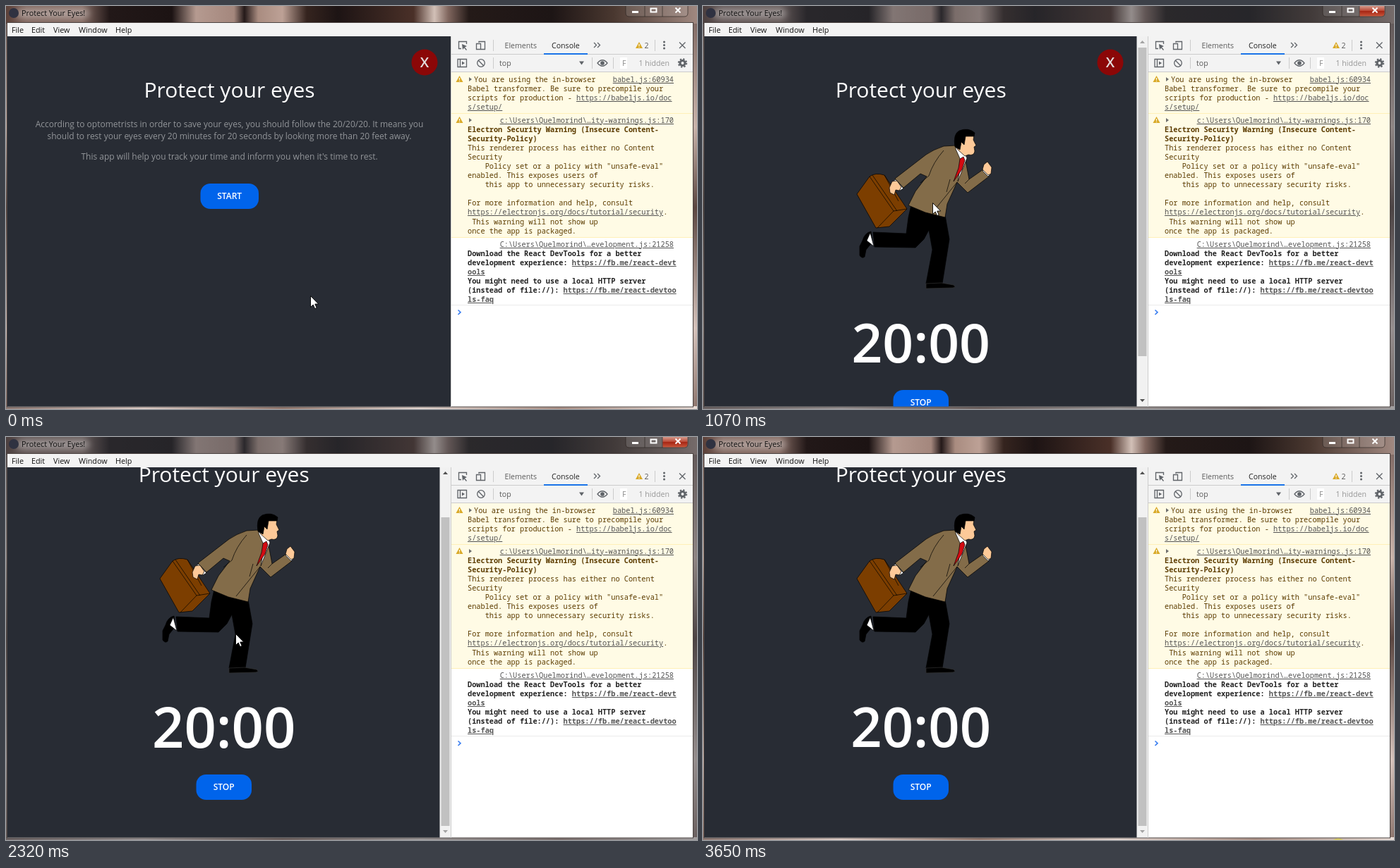
Animation of 979 by 572 pixels, one loop 3.73 s. Source, as an HTML page:

```html
<!DOCTYPE html>
<html lang="en">
<head>
<meta charset="utf-8">
<title>Protect Your Eyes!</title>
<style>
html, body { margin: 0; width: 100%; height: 100%; overflow: hidden; background: #fff; }
svg { position: absolute; left: 0; top: 0; display: block; }
text { font-family: "Open Sans", "Noto Sans", sans-serif; }
.ui { font-size: 10.8px; fill: #111; }
.tool { font-size: 10.6px; fill: #5a5a5a; }
.app { text-anchor: middle; fill: #fff; }
.title { font-size: 30px; }
.copy { font-size: 12px; fill: #929599; }
.label { font-size: 12px; font-weight: 600; }
.cross { font-size: 20px; font-weight: 600; fill: #e4dede; }
.clock { font-size: 76px; font-weight: 600; }
.icon { fill: none; stroke: #5f6368; stroke-width: 1.3; }
pre {
  position: absolute; left: 654px; width: 300px; margin: 0; color: #5c3c00;
  font: 10.27px/13.1px "Noto Sans Mono", "DejaVu Sans Mono", monospace;
}
pre.plain { color: #222; }
pre u { color: #545454; }
pre .src { position: absolute; right: 8px; top: 0; font-weight: 400; }
</style>
</head>
<body>
<svg width="979" height="572" viewBox="0 0 979 572">
  <defs>
    <linearGradient id="top">
      <stop offset="0" stop-color="#5b4038"/><stop offset=".03" stop-color="#80665e"/>
      <stop offset=".11" stop-color="#846a62"/><stop offset=".15" stop-color="#221818"/>
      <stop offset=".24" stop-color="#1c1313"/><stop offset=".275" stop-color="#b59a90"/>
      <stop offset=".33" stop-color="#a4877d"/><stop offset=".345" stop-color="#241919"/>
      <stop offset=".365" stop-color="#a98c80"/><stop offset=".4" stop-color="#bda196"/>
      <stop offset=".435" stop-color="#35241f"/><stop offset=".48" stop-color="#1d1414"/>
      <stop offset=".59" stop-color="#4a3028"/><stop offset=".62" stop-color="#d2c0b7"/>
      <stop offset=".64" stop-color="#80665e"/><stop offset=".67" stop-color="#241a18"/>
      <stop offset=".79" stop-color="#1d1515"/><stop offset=".88" stop-color="#4a3830"/>
      <stop offset="1" stop-color="#a08880"/>
    </linearGradient>
    <linearGradient id="side" x2="0" y2="1">
      <stop offset="0" stop-color="#77605a"/><stop offset=".3" stop-color="#c9b3aa"/>
      <stop offset=".5" stop-color="#5b4640"/><stop offset=".8" stop-color="#d5c2bb"/>
      <stop offset="1" stop-color="#8d756d"/>
    </linearGradient>
    <linearGradient id="base">
      <stop offset="0" stop-color="#8f7b75"/><stop offset=".2" stop-color="#dcccc6"/>
      <stop offset=".4" stop-color="#947a70"/><stop offset=".6" stop-color="#e3d6d0"/>
      <stop offset=".8" stop-color="#ab9187"/><stop offset="1" stop-color="#e8dcd6"/>
    </linearGradient>
    <linearGradient id="red" x2="0" y2="1">
      <stop offset="0" stop-color="#d59a8c"/><stop offset=".45" stop-color="#bd4b38"/>
      <stop offset=".5" stop-color="#a62413"/><stop offset="1" stop-color="#c8553a"/>
    </linearGradient>
    <filter id="blur" x="-20%" y="-100%" width="140%" height="300%"><feGaussianBlur stdDeviation="5"/></filter>
    <clipPath id="panel"><path d="M2 43H630.5V568.5H2Z"/></clipPath>
  </defs>

  <!-- window frame -->
  <rect width="979" height="572" fill="url(#side)"/>
  <rect width="979" height="25" fill="url(#top)"/>
  <rect y="568" width="979" height="4" fill="url(#base)"/>
  <path id="tint" d="M0 0H979V572H0Z" fill="#35404a" opacity="0"/>
  <rect x="14" y="4" width="104" height="13" rx="6" fill="#fff" opacity=".38" filter="url(#blur)"/>
  <path d="M878 0V10Q878 15 883 15H961Q966 15 966 10V0M905 0V15M930 0V15" fill="#fff" fill-opacity=".12" stroke="#2a2220" stroke-opacity=".65"/>
  <path id="close" d="M930.5 0V14.5H961Q965.5 14.5 965.5 10V0Z" fill="url(#red)" opacity="0"/>
  <path d="M887 8.5H896" stroke="#fff" stroke-width="3"/>
  <rect x="913.5" y="3.5" width="8" height="5" fill="none" stroke="#fff" stroke-width="2"/>
  <path d="M948.5 2.5L955.5 9.5M955.5 2.5L948.5 9.5" stroke="#fff" stroke-width="2"/>
  <circle cx="11" cy="10" r="7" fill="#2f3241"/>
  <text class="ui" x="22" y="14">Protect Your Eyes!</text>
  <rect x="1.5" y="23.5" width="972" height="545.5" fill="#fff" stroke="#4a4240"/>
  <path d="M2 24H973V43H2Z" fill="#f3f3f3"/>
  <g class="ui">
    <text x="8" y="38">File</text><text x="36" y="38">Edit</text><text x="67" y="38">View</text>
    <text x="103" y="38">Window</text><text x="155" y="38">Help</text>
  </g>

  <!-- app -->
  <g clip-path="url(#panel)">
    <path d="M2 43H631V569H2Z" fill="#282c34"/>
    <g id="intro" class="app">
      <circle cx="593" cy="80" r="18.5" fill="#8b0707"/>
      <text class="cross" x="593" y="87">X</text>
      <text class="title" x="316.5" y="130">Protect your eyes</text>
      <g class="copy">
        <text class="copy" x="316.5" y="172">According to optometrists in order to save your eyes, you should follow the 20/20/20. It means you</text>
        <text class="copy" x="316.5" y="189">should to rest your eyes every 20 minutes for 20 seconds by looking more than 20 feet away.</text>
        <text class="copy" x="316.5" y="218">This app will help you track your time and inform you when it's time to rest.</text>
      </g>
      <rect x="275.5" y="252" width="82.5" height="36" rx="14" fill="#0064eb"/>
      <text class="label" x="316.7" y="274.3">START</text>
    </g>
    <g id="timer" class="app" display="none">
      <g id="page">
        <circle cx="577" cy="80" r="18.5" fill="#8b0707"/>
        <text class="cross" x="577" y="87">X</text>
        <text class="title" x="308.7" y="130">Protect your eyes</text>
        <g stroke="#000" stroke-width=".7" stroke-linejoin="round">
          <path d="M296 278L291 300L288 323L241 321L243 342L301 343L313 331L320 318L325 346L316 394H339L349 331L343 297Z" fill="#000"/>
          <path d="M316 394L338 393L355 396Q359 399 354 400L316 401Z" fill="#000" stroke="#333"/>
          <path d="M238 320Q229 322 226 333L222 341V354Q225 359 229 356L231 346L240 335Z" fill="#000"/>
          <path d="M237 322L242 341L232 333Z" fill="#fff"/>
          <path d="M218 267L236 242Q244 236 257 240L289 288L264 313L245 315Z" fill="#7c3e00"/>
          <path d="M236 242L270 291L247 315M257 240L277 277M270 291L289 288M240 240L275 291" fill="none"/>
          <path d="M273 246L284 259L279 262L269 249Z" fill="#fff"/>
          <path d="M264 258L268 249L275 248L281 257L278 262L273 261L271 268L265 265Z" fill="#fdc998"/>
          <path d="M358 198L341 199Q326 204 316 211L272 245L284 258L308 238L317 242L301 263L291 283L315 293L343 300L346 281L360 250L375 265L405 242L397 232L377 246L370 209Z" fill="#836c49"/>
          <path d="M360 250L326 292M341 205Q326 222 320 241L308 251M350 246L345 264M377 246L371 252" fill="none"/>
          <path d="M359 196L358 203L366 221L361 249L374 216L371 209Z" fill="#fff"/>
          <path d="M364 217L369 214L371 219L367 232L355 249L362 230Z" fill="#d30b12"/>
          <path d="M396 234L404 242L408 238L399 231Z" fill="#fff"/>
          <path d="M396 232L398 225L403 221L409 229L408 238L404 240Z" fill="#fdc998"/>
          <path d="M363 186Q370 180 384 183L383 190L387 198L384 200L385 206Q384 213 376 211L371 213L360 203Z" fill="#fdc998"/>
          <path d="M357 200Q354 182 363 177Q376 172 385 180L384 185L372 185L370 197L366 193L364 204Z" fill="#000"/>
        </g>
        <g id="pulse"><text class="clock" x="308.7" y="505.5">20:00</text></g>
        <rect x="269.5" y="545" width="78.5" height="36" rx="14" fill="#0064eb"/>
        <text class="label" x="308.7" y="567.3">STOP</text>
      </g>
      <path d="M614.5 43H631V569H614.5Z" fill="#f1f1f1"/>
      <rect id="thumb" x="616.5" width="12" height="438" fill="#c1c1c1"/>
      <path id="up" d="M619 53L622.5 49L626 53Z"/>
      <path id="down" d="M619 558L622.5 562L626 558Z"/>
    </g>
  </g>

  <!-- developer tools -->
  <path d="M631 43H973V93.5H631Z" fill="#f3f3f3"/>
  <path d="M631 68.5H973M631 93.5H973M630.5 43V569" stroke="#ccc"/>
  <path d="M631 94H973V328H631Z" fill="#fffbe5"/>
  <path d="M631 152.5H973M631 328.5H973" stroke="#fff0b8"/>
  <path d="M631 424.5H973" stroke="#ececec"/>
  <path d="M762 67H824V69H762Z" fill="#1a73e8"/>
  <g stroke="#ccc"><path d="M690.5 48V64M690.5 73V89M830.5 73V89M860.5 73V89M919.5 48V64"/></g>
  <g class="icon">
    <path d="M645 60.5H641.5V50.5H652.5V54"/>
    <path d="M646 54L653 57L650 58.5L653 62L652 63L649 59.5L647 62Z" fill="#5f6368" stroke="none"/>
    <path d="M670 52V50.5H678.5V61.5H673M666.5 53.5H672.5V61.5H666.5Z"/>
    <path d="M640 75.5H652.5V86.5H640ZM643.5 75.5V86.5"/><path d="M646 78.5L650 81L646 83.5Z" fill="#5f6368" stroke="none"/>
    <circle cx="673" cy="81" r="5.3"/><path d="M669.3 77.3L676.7 84.7"/>
    <path d="M833 52L836.5 55.5L833 59M838 52L841.5 55.5L838 59"/>
    <path d="M954 51.5L962.5 60M962.5 51.5L954 60"/>
    <path d="M838 81Q845 72.5 852 81Q845 89.5 838 81Z"/><circle cx="845" cy="81" r="2.2" fill="#5f6368"/>
    <circle cx="958.5" cy="81" r="3.5" stroke-width="3"/><circle cx="958.5" cy="81" r="5.7" stroke-width="2" stroke-dasharray="2.3 2.18"/>
  </g>
  <g fill="#5f6368"><circle cx="932.5" cy="51" r="1.5"/><circle cx="932.5" cy="55.5" r="1.5"/><circle cx="932.5" cy="60" r="1.5"/><path d="M812 78.5H819L815.5 83.5Z"/></g>
  <path d="M870 73H880V89H870Z" fill="#fff"/>
  <g class="tool">
    <text x="706.5" y="60">Elements</text><text x="773" y="60" fill="#222">Console</text><text x="904.5" y="60">2</text>
    <text x="699" y="85">top</text><text x="873" y="85" opacity=".7">F</text><text x="896.5" y="85" opacity=".6">1 hidden</text>
  </g>
  <g id="warn"><path d="M897 51L902 60H892Z" fill="#d9a927"/><path d="M897 54V57M897 58V59" stroke="#fff" stroke-width="1.2"/></g>
  <use href="#warn" x="-254.500" y="48"/><use href="#warn" x="-254.500" y="106"/>
  <path d="M656 101L660 104L656 107ZM656 159L660 162L656 165Z" fill="#6e6e6e"/>
  <path d="M640.500 431.500L644 434.700L640.500 438" fill="none" stroke="#367cf1" stroke-width="1.600"/>
</svg>

<pre style="top:97.500px"><span style="padding-left:9px">You are using the in-browser</span><u class="src">babel.js:60934</u>
Babel transformer. Be sure to precompile your
scripts for production - <u>https://babeljs.io/doc</u>
<u>s/setup/</u></pre>
<pre style="top:155.500px"><u class="src">c:\Users\Quelmorind\…ity-warnings.js:170</u>&nbsp;
<b>Electron Security Warning (Insecure Content-
Security-Policy)</b>
This renderer process has either no Content
Security
    Policy set or a policy with "unsafe-eval"
enabled. This exposes users of
    this app to unnecessary security risks.

For more information and help, consult
<u>https://electronjs.org/docs/tutorial/security</u>.
 This warning will not show up
once the app is packaged.</pre>
<pre class="plain" style="top:331.500px"><u class="src">C:\Users\Quelmorind\…evelopment.js:21258</u>&nbsp;
<b>Download the React DevTools for a better
development experience: <u>https://fb.me/react-devt</u>
<u>ools</u>
You might need to use a local HTTP server
(instead of file://): <u>https://fb.me/react-devtoo</u>
<u>ls-faq</u></b></pre>

<svg width="979" height="572" viewBox="0 0 979 572">
  <g id="pointer">
    <circle id="click" r="11.500" fill="#dcd81a" opacity=".5"/>
    <path id="arrow" d="M.5 .5V16.500L4.200 13L6.700 18.600L9.200 17.500L6.800 12H11.700Z" fill="#fff" stroke="#000" stroke-width=".9"/>
    <path id="hand" d="M.5 12V2Q2 -.5 3.500 2V7.500L10 9Q11.500 9.500 11.300 12L9.500 19.500H2.500L-3 12.500Q-3.500 9.500 -1 10.500Z" fill="#fff" stroke="#222" stroke-width=".9"/>
  </g>
</svg>

<script>
const LOOP = 3730, OPEN = 990, SCROLL = 66;
const bursts = [[70, 540, 7], [690, 820, 2], [990, 1390, 6], [1540, 2020, 7],
  [2090, 2550, 7], [2630, 3100, 7], [3180, 3410, 4], [3560, 3650, 2]];
const ticks = [0, ...bursts.flatMap(([a, b, n]) =>
  Array.from({ length: n }, (_, i) => a + (b - a) * i / (n - 1)))];
// Pointer route as [time, x, y]
const route = [[0, 431, 411], [150, 413, 388], [300, 365, 325], [450, 328, 283], [540, 325, 279],
  [2320, 325, 279], [2550, 699, 480], [2860, 832, 538], [3100, 891, 562], [3250, 900, 581], [LOOP, 900, 581]];

const $ = id => document.getElementById(id);
const set = (id, name, value) => $(id).setAttribute(name, value);
const show = (id, on) => set(id, 'display', on ? 'inline' : 'none');
const clamp = v => Math.min(1, Math.max(0, v));
const smooth = p => p * p * (3 - 2 * p);

// cubic-bezier(.25, .1, .25, 1)
function ease(x) {
  const curve = (s, a, b) => 3 * (1 - s) ** 2 * s * a + 3 * (1 - s) * s * s * b + s ** 3;
  let lo = 0, hi = 1;
  for (let i = 0; i < 20; i++) {
    const mid = (lo + hi) / 2;
    if (curve(mid, .25, .25) < x) lo = mid; else hi = mid;
  }
  return curve(lo, .1, 1);
}

function pointAt(t) {
  const i = route.findIndex(p => p[0] > t);
  const [t0, x0, y0] = route[i - 1], [t1, x1, y1] = route[i];
  const p = (t - t0) / (t1 - t0);
  return [x0 + (x1 - x0) * p, y0 + (y1 - y0) * p];
}

function draw(time) {
  const t = ticks.findLast(v => v <= time + .01);
  const [x, y] = pointAt(t);
  const open = t >= OPEN;
  const hover = !open && x > 275 && x < 358 && y > 252 && y < 288;
  set('pointer', 'transform', `translate(${x} ${y})`);
  show('arrow', !hover);
  show('hand', hover);
  show('click', t >= 690 && !open || t >= 3560);

  const focus = t < 690 || t >= 3650 ? 0 : t < 820 || t >= 3560 ? .5 : 1;
  set('tint', 'opacity', focus * .4);
  set('close', 'opacity', focus);

  show('intro', !open);
  show('timer', open);
  if (!open) return;
  const scroll = SCROLL * smooth(clamp((t - 1880) / 250));
  set('page', 'transform', `translate(0 ${-Math.round(scroll)})`);
  set('thumb', 'y', 59 + scroll * 55 / SCROLL);
  set('up', 'fill', scroll > 0 ? '#505050' : '#a3a3a3');
  set('down', 'fill', scroll < SCROLL ? '#505050' : '#a3a3a3');

  const beat = (t - OPEN) % 1000 / 500;
  const grow = 1 + .05 * (beat < 1 ? ease(beat) : 1 - ease(beat - 1));
  set('pulse', 'transform', `translate(308.7 478) scale(${grow}) translate(-308.7 -478)`);
}

const start = performance.now();
function tick() {
  draw((performance.now() - start) % LOOP);
  requestAnimationFrame(tick);
}
tick();
</script>
</body>
</html>
```
